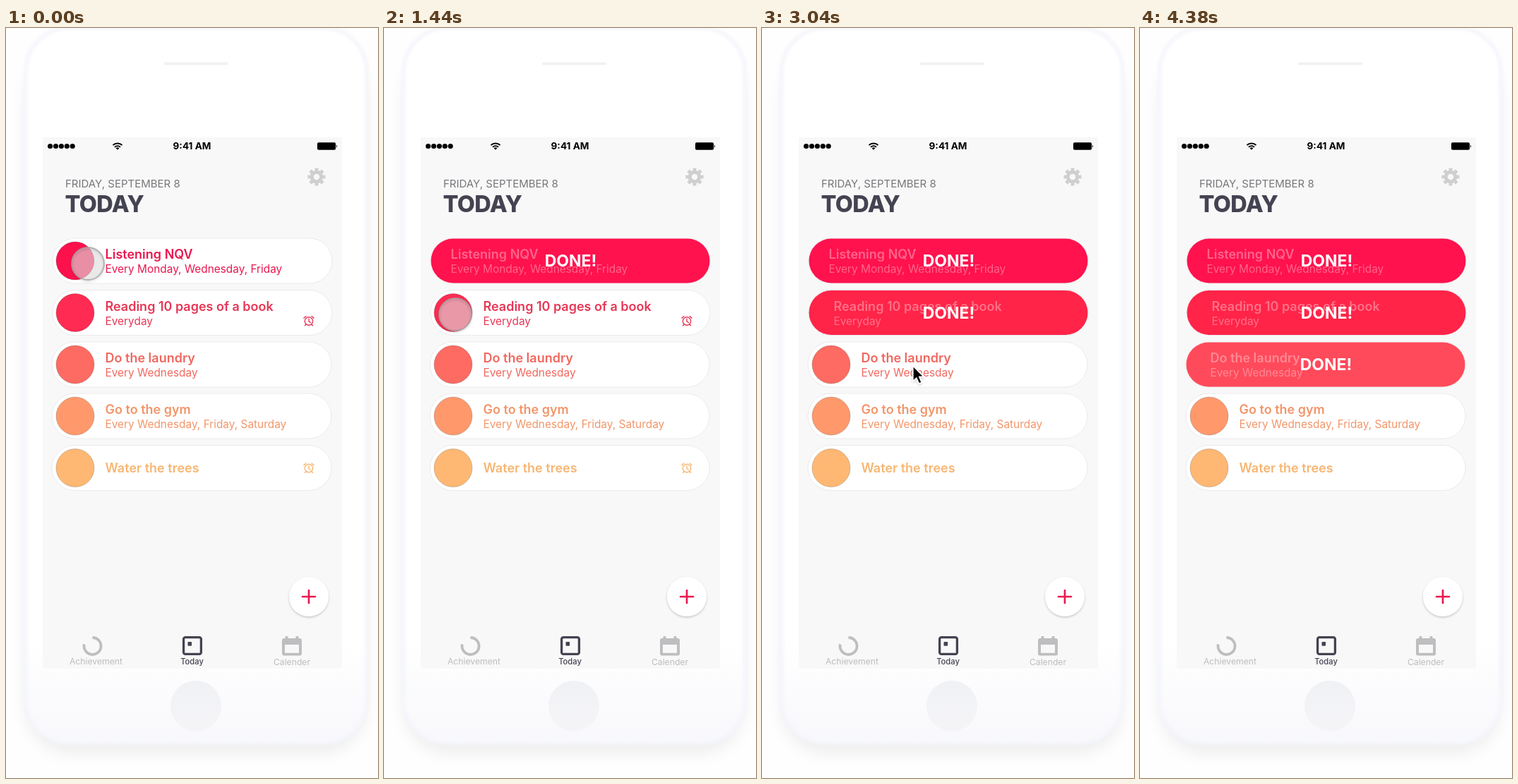
Animation, 527 px wide and 1063 px high, one loop 5.24 s. Source, as an HTML page:

```html
<!DOCTYPE html>
<html lang="en">
<head>
<meta charset="utf-8">
<title>Habit list</title>
<style>
  html, body { margin: 0; width: 100%; height: 100%; overflow: hidden; background: #fefefe; }
  svg { display: block; width: 100vw; height: 100vh; }
  text { font-family: Inter, sans-serif; }
  .title { font-size: 18px; font-weight: 600; }
  .note { font-size: 15.4px; }
  .done { font-size: 23px; font-weight: 700; fill: #fff; }
  .tab { font-size: 12.2px; fill: #bdbdbf; }
  .line { fill: none; stroke-linecap: round; stroke-linejoin: round; }
</style>
</head>
<body>
<svg viewBox="0 0 527 1063" preserveAspectRatio="none">
  <defs>
    <filter id="soft" x="-20%" y="-20%" width="140%" height="140%"><feGaussianBlur stdDeviation="13"/></filter>
    <filter id="edge"><feGaussianBlur stdDeviation="2"/></filter>
    <filter id="lift" x="-30%" y="-30%" width="160%" height="160%">
      <feDropShadow dx="0" dy="1.5" stdDeviation="1.8" flood-opacity=".22"/>
    </filter>
    <linearGradient id="body" x2="0" y2="1">
      <stop offset=".86" stop-color="#fff"/><stop offset="1" stop-color="#f8f8fc"/>
    </linearGradient>
    <linearGradient id="home" x2="0" y2="1">
      <stop stop-color="#f0f1f4"/><stop offset="1" stop-color="#f5f5f8"/>
    </linearGradient>
    <g id="alarm" class="line" stroke-width="1.4">
      <circle r="5.7"/>
      <path d="M0-3.3V.4L2.5 2M-7-4.4-4-7M7-4.4 4-7M-4 4.5-5.5 6.2M4 4.5 5.5 6.2"/>
    </g>
  </defs>

  <!-- phone -->
  <rect x="30" y="40" width="478" height="986" rx="62" fill="#000" opacity=".075" filter="url(#soft)"/>
  <rect x="27" y="-1" width="485" height="1016" rx="62" fill="url(#body)"/>
  <rect x="28" y="0" width="483" height="1014" rx="61" fill="none" stroke="#f4f5fb" stroke-width="5" filter="url(#edge)"/>
  <rect x="224" y="48.5" width="91" height="4" rx="2" fill="#f1f1f4"/>
  <circle cx="269" cy="961" r="36" fill="url(#home)"/>
  <rect x="52" y="155" width="424" height="753" fill="#f8f8f8"/>

  <!-- status bar -->
  <path class="line" d="M62.6 167.5H94.5" stroke="#000" stroke-width="7.2" stroke-dasharray="0 7.9"/>
  <g class="line" stroke="#000" stroke-width="2" style="stroke-linecap:butt">
    <path d="M151.5 166A9.5 9.5 0 0 1 164.5 166M154 168.8A6 6 0 0 1 162 168.8"/>
  </g>
  <path d="M155.6 170.2A3.6 3.6 0 0 1 160.4 170.2L158 172.8Z"/>
  <text x="263.5" y="172" text-anchor="middle" font-size="13.6" font-weight="700">9:41 AM</text>
  <rect x="441" y="162.3" width="26" height="10.4" rx="1.8"/>
  <path d="M467.8 165.2Q470 167.5 467.8 169.8Z"/>

  <!-- header -->
  <text x="84" y="225.5" font-size="15" fill="#77777c">FRIDAY, SEPTEMBER 8</text>
  <text x="83.5" y="261" font-size="32.5" font-weight="800" letter-spacing="-.6" fill="#444352">TODAY</text>
  <g fill="none" stroke="#cfcfcf" transform="translate(440 211)">
    <circle r="6.8" stroke-width="5.2"/>
    <circle r="10.4" stroke-width="4.4" pathLength="16" stroke-dasharray="1.15 .85" stroke-dashoffset=".575"/>
  </g>

  <g id="rows"></g>

  <!-- add button -->
  <circle cx="429" cy="806" r="28" fill="#fff" filter="url(#lift)"/>
  <path class="line" d="M420 806H438M429 797V815" stroke="#ea1a50" stroke-width="2.7"/>

  <!-- tabs -->
  <path class="line" d="M110.8 873.5A12 12 0 1 0 122.5 864" stroke="#bebec0" stroke-width="3.8" style="stroke-linecap:butt"/>
  <rect x="251.6" y="863.6" width="24.8" height="23.8" rx="2.5" fill="none" stroke="#444352" stroke-width="3.3"/>
  <rect x="257.5" y="870" width="5.6" height="5.8" rx="1" fill="#444352"/>
  <g fill="#bebec0">
    <rect x="391" y="865" width="28" height="24.5" rx="3"/>
    <rect x="395.5" y="862" width="4" height="6" rx="1"/>
    <rect x="410.5" y="862" width="4" height="6" rx="1"/>
  </g>
  <rect x="395" y="874" width="20" height="11.8" fill="#f8f8f8"/>
  <g text-anchor="middle">
    <text class="tab" x="127.5" y="902">Achievement</text>
    <text class="tab" x="263.5" y="902" style="font-size:11.2px;font-weight:500;fill:#444352">Today</text>
    <text class="tab" x="405" y="903">Calender</text>
  </g>

  <g id="finger">
    <circle r="23" fill="#dcdcdc" fill-opacity=".62"/>
    <circle r="23" fill="none" stroke="#a2a2a2" stroke-opacity=".8" stroke-width="1.8" filter="url(#lift)"/>
  </g>
  <path id="arrow" d="M.8 1.8V23.5L5.8 19 9.4 27 13.2 25.4 9.8 17.4H16.4Z" stroke="#fff" stroke-width="1.6" filter="url(#lift)"/>
</svg>

<script>
const LOOP = 5240;
const ALARM_OFF = 1640;
const $ = id => document.getElementById(id);

// swipe: [start, end] of the fill; shift: how far the text slides left
const rows = [
  { y: 330,   x: 66, title: 'Listening NQV', note: 'Every Monday, Wednesday, Friday',
    ink: '#e9184f', dot: '#fd114c', done: '#ff124e', swipe: [110, 580], shift: 46 },
  { y: 403.5, x: 66, title: 'Reading 10 pages of a book', note: 'Everyday', alarm: true,
    ink: '#e63756', dot: '#ff2b52', done: '#ff2448', swipe: [1640, 2160], shift: 39 },
  { y: 477,   x: 65, title: 'Do the laundry', note: 'Every Wednesday',
    ink: '#f0685f', dot: '#fd6b62', done: '#ff4a5b', swipe: [3060, 3640], shift: 41 },
  { y: 550,   x: 65, title: 'Go to the gym', note: 'Every Wednesday, Friday, Saturday',
    ink: '#f2966a', dot: '#ff996c' },
  { y: 623.5, x: 65, title: 'Water the trees', alarm: true,
    ink: '#f7b672', dot: '#ffb873' }
];

// pointer stops: time, x, y
const path = [
  [0, 116, 334], [30, 116, 334], [110, 200, 334], [420, 378, 337], [680, 378, 337],
  [1090, 255, 436], [1380, 98, 404], [1440, 101, 406], [1460, 101, 406], [1600, 205, 411],
  [1800, 237, 418], [2280, 237, 418], [2360, 244, 436], [2660, 115, 497],
  [2880, 115, 497], [3040, 213, 477], [3400, 275, 480], [4250, 275, 480], [4380, 540, 462]
];
const presses = [[0, 110], [1400, 1560], [2640, 2990]];

const lerp = (a, b, p) => a + (b - a) * p;
const progress = (t, a, b) => Math.min(1, Math.max(0, (t - a) / (b - a)));
const smooth = p => p * p * (3 - 2 * p);
const setAll = (el, attrs) => Object.entries(attrs).forEach(([k, v]) => el.setAttribute(k, v));

function rowMarkup(r, i) {
  const words = `<text class="title" x="140.5" y="${r.y + (r.note ? -3 : 6.5)}">${r.title}</text>` +
    (r.note ? `<text class="note" x="140.5" y="${r.y + 17}">${r.note}</text>` : '');
  return `<g>
    <rect x="${r.x}" y="${r.y - 32}" width="396" height="64" rx="32" fill="#fff" stroke="#ebebeb"/>
    <g class="words" fill="${r.ink}">${words}</g>
    ${r.alarm ? `<use class="alarm" href="#alarm" x="429" y="${r.y + (r.note ? 12 : 0.5)}" stroke="${r.ink}"/>` : ''}
    <clipPath id="clip${i}"><rect class="shape"/></clipPath>
    <rect class="shape fill" stroke="#000"/>
    <g clip-path="url(#clip${i})"><g class="words" fill="#fff" opacity=".35">${words}</g></g>
    <text class="done" x="${r.x + 198.5}" y="${r.y + 8.3}" text-anchor="middle">DONE!</text>
  </g>`;
}

$('rows').innerHTML = rows.map(rowMarkup).join('');
rows.forEach((r, i) => {
  const g = $('rows').children[i];
  r.words = g.querySelectorAll('.words');
  r.shapes = g.querySelectorAll('.shape');
  r.fill = g.querySelector('.fill');
  r.label = g.querySelector('.done');
});
const lastAlarm = $('rows').lastElementChild.querySelector('.alarm');

function drawRow(r, t) {
  const raw = r.swipe ? progress(t, ...r.swipe) : 0;
  const p = 1 - (1 - raw) ** 3;
  const h = lerp(54, 63, p);
  const box = { x: lerp(71, r.x + .5, p), y: r.y - h / 2, width: lerp(54, 395, p), height: h, rx: h / 2 };
  r.shapes.forEach(s => setAll(s, box));
  r.fill.style.fill = r.done ? `color-mix(in srgb, ${r.done} ${p * 100}%, ${r.dot})` : r.dot;
  r.fill.setAttribute('stroke-opacity', .18 * (1 - p));
  r.words.forEach(w => w.setAttribute('transform', `translate(${-(r.shift || 0) * p} 0)`));
  r.label.setAttribute('opacity', smooth(progress(raw, .35, .85)));
}

function pointerAt(t) {
  const next = path.findIndex(k => k[0] > t);
  if (next < 0) return path[path.length - 1].slice(1);
  const [a, b] = [path[next - 1], path[next]];
  const p = smooth(progress(t, a[0], b[0]));
  return [lerp(a[1], b[1], p), lerp(a[2], b[2], p)];
}

function draw(t) {
  rows.forEach(r => drawRow(r, t));
  lastAlarm.style.display = t < ALARM_OFF ? '' : 'none';
  const pressed = presses.some(([a, b]) => t >= a && t < b);
  const place = `translate(${pointerAt(t).join(' ')})`;
  for (const [id, shown] of [['finger', pressed], ['arrow', !pressed && t < 4380]]) {
    $(id).setAttribute('transform', place);
    $(id).style.display = shown ? '' : 'none';
  }
}

const begin = performance.now();
function tick() {
  draw((performance.now() - begin) % LOOP);
  requestAnimationFrame(tick);
}
tick();
</script>
</body>
</html>
```
